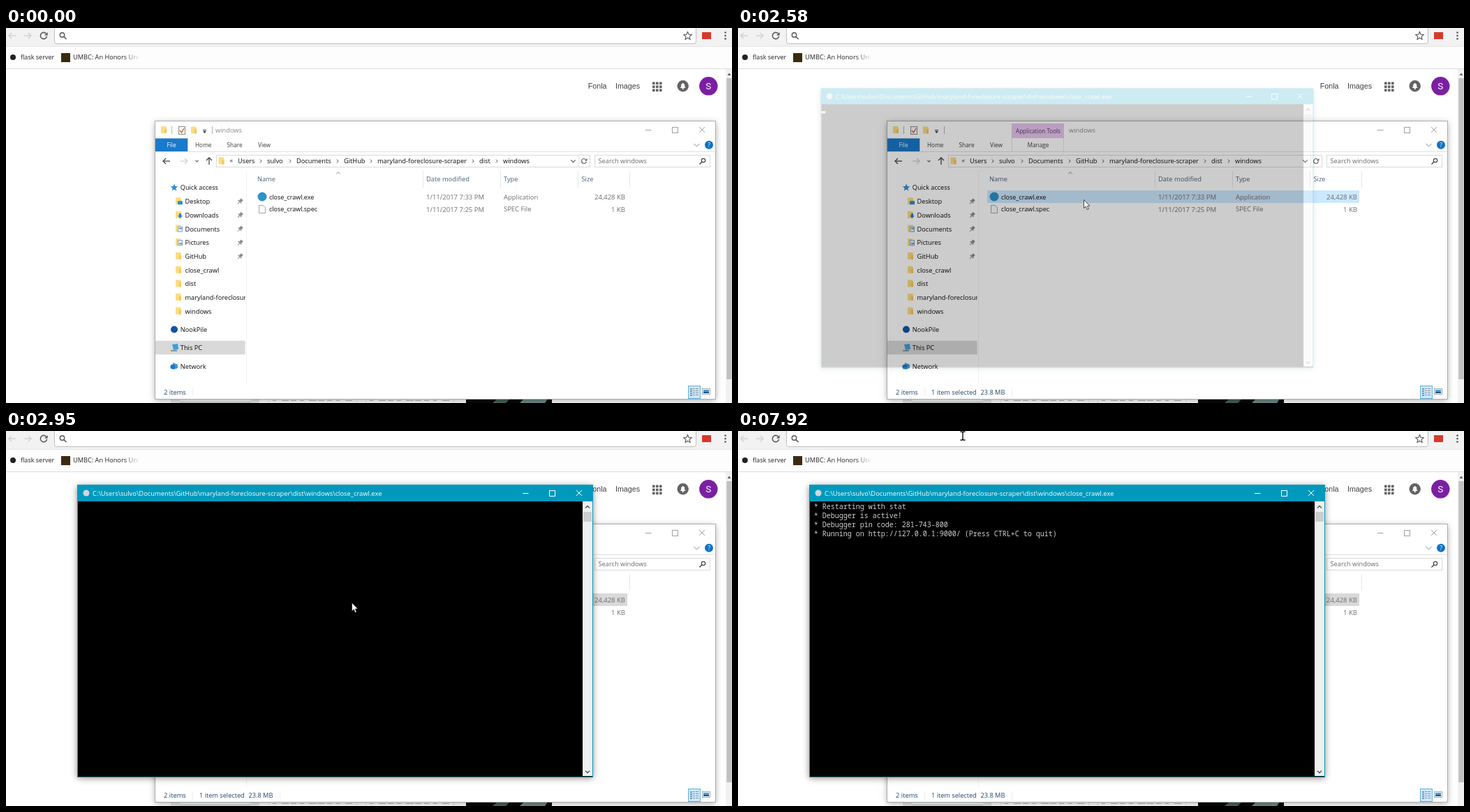
These frames come from a looping animation (1040 px wide and 538 px high, 8 s). An HTML page with a canvas:

```html
<!DOCTYPE html>
<html lang="en">
<head>
<meta charset="utf-8">
<title>Launching close_crawl</title>
<style>
html, body { margin: 0; width: 100%; height: 100%; overflow: hidden; background: #fff; }
canvas { display: block; }
</style>
</head>
<body>
<canvas id="stage" width="1040" height="538"></canvas>
<script>
const W = 1040, H = 538, LOOP = 8000;
const SANS = '"Open Sans", "Noto Sans", sans-serif';
const ARIAL = '"Liberation Sans", Arial, sans-serif';
const MONO = '"Noto Sans Mono", "DejaVu Sans Mono", monospace';
const ACCENT = '#0099bc';
const USER = 'sulvo';

const stage = document.getElementById('stage').getContext('2d');
const layer = document.createElement('canvas');
layer.width = W;
layer.height = H;
const layerCtx = layer.getContext('2d');
let c = stage;

// ---- drawing helpers ----
function rect(x, y, w, h, color) {
  c.fillStyle = color;
  c.fillRect(x, y, w, h);
}
function frame(x, y, w, h, color) {
  c.strokeStyle = color;
  c.lineWidth = 1;
  c.strokeRect(x + .5, y + .5, w - 1, h - 1);
}
function disc(x, y, r, color) {
  c.fillStyle = color;
  c.beginPath();
  c.arc(x, y, r, 0, 7);
  c.fill();
}
function path(points) {
  c.beginPath();
  for (let i = 0; i < points.length; i += 2) c.lineTo(points[i], points[i + 1]);
}
function line(points, color, width = 1) {
  path(points);
  c.strokeStyle = color;
  c.lineWidth = width;
  c.stroke();
}
function poly(points, color) {
  path(points);
  c.closePath();
  c.fillStyle = color;
  c.fill();
}
// y is the middle of the capitals
function text(s, x, y, color = '#0c0c0c', size = 9.25, align = 'left', font = SANS) {
  c.font = size + 'px ' + font;
  c.textAlign = align;
  c.fillStyle = color;
  c.fillText(s, x, y + size * .37);
}
// dir: 0 right, 1 down, 2 left, 3 up
function chevron(x, y, dir, color, r = 2, width = 1) {
  c.save();
  c.translate(x, y);
  c.rotate(dir * Math.PI / 2);
  line([-r / 2, -r, r / 2, 0, -r / 2, r], color, width);
  c.restore();
}
function arrow(x, y, dir, color, r = 5, width = 1.3) {
  c.save();
  c.translate(x, y);
  c.rotate(dir * Math.PI / 2);
  line([-r, 0, r, 0], color, width);
  line([r - 4, -4, r, 0, r - 4, 4], color, width);
  c.restore();
}
function ring(x, y, r, color, width, from = 0, to = 7) {
  c.strokeStyle = color;
  c.lineWidth = width;
  c.beginPath();
  c.arc(x, y, r, from, to);
  c.stroke();
}
function reload(x, y, r, color, width) {
  ring(x, y, r, color, width, .2, 5.5);
  poly([x + r + 1, y - r - .5, x + r + 1, y - .5, x + 1, y - .5], color);
}
function star(x, y, r) {
  const p = [];
  for (let i = 0; i < 10; i++) {
    const a = i * Math.PI / 5 - Math.PI / 2, d = i % 2 ? r * .45 : r;
    p.push(x + d * Math.cos(a), y + d * Math.sin(a));
  }
  path(p);
  c.closePath();
}
function folder(x, y) {
  poly([x - 4, y - 5, x + 3, y - 5, x + 4, y - 3, x + 4, y + 5, x - 4, y + 5], '#fcdc82');
  rect(x + 1, y - 1, 3, 6, '#f5c75f');
}
function captionButtons(x, y, gap, color) {
  line([x - 4, y + .5, x + 4.5, y + .5], color);
  frame(x + gap - 4, y - 4, 9, 9, color);
  const k = x + 2 * gap + 1;
  line([k - 4, y - 4, k + 4, y + 4], color);
  line([k - 4, y + 4, k + 4, y - 4], color);
}
function panel(x, y, w, h, fill, shade) {
  c.save();
  c.shadowColor = `rgba(0,0,0,${shade})`;
  c.shadowBlur = 9;
  c.shadowOffsetY = 2;
  rect(x, y, w, h, fill);
  c.restore();
}

// ---- browser ----
function browser() {
  rect(0, 0, W, H, '#fff');
  rect(0, 0, W, 27, '#f2f2f2');
  rect(0, 26, W, 1, '#e6e6e6');
  rect(0, 27, W, 31, '#fdfdfd');
  rect(0, 58, W, 1, '#dcdcdc');
  c.beginPath();
  c.roundRect(69.5, -5, 919, 27.5, 3);
  c.fillStyle = '#fff';
  c.fill();
  c.strokeStyle = '#bdbdbd';
  c.lineWidth = 1;
  c.stroke();
  arrow(9, 11, 2, '#cfcfcf');
  arrow(31, 11, 0, '#cfcfcf');
  reload(54, 11, 4.6, '#555', 1.6);
  ring(80.5, 10, 3.2, '#555', 1.4);
  line([83, 12.5, 86.5, 16], '#555', 1.6);
  star(976.5, 11.5, 6);
  c.strokeStyle = '#555';
  c.lineWidth = 1.1;
  c.stroke();
  rect(997, 6, 13, 10, '#d6392c');
  for (const y of [6.5, 11, 15.5]) disc(1030.5, y, 1.3, '#555');

  disc(10, 42, 4, '#222');
  text('flask server', 21, 42, '#222', 9.05);
  rect(79, 36, 13, 13, '#3b2a10');
  text('UMBC: An Honors Uni', 96, 42, '#222', 9.2);
  const fade = c.createLinearGradient(168, 0, 192, 0);
  fade.addColorStop(0, 'rgba(253,253,253,0)');
  fade.addColorStop(1, '#fdfdfd');
  rect(168, 34, 40, 18, fade);

  text('Fonla', 860.5, 83.5, '#404040', 10.7, 'right', ARIAL);
  text('Images', 873, 83.5, '#404040', 10.7, 'left', ARIAL);
  for (let i = 0; i < 9; i++) rect(926 + i % 3 * 5, 77.5 + (i / 3 | 0) * 5, 3.6, 3.6, '#636363');
  disc(969.7, 83.3, 8.2, '#636363');
  poly([965.7, 86, 967.2, 84, 967.2, 81, 969.7, 78.8, 972.2, 81, 972.2, 84, 973.7, 86], '#fff');
  disc(969.7, 87.2, 1.1, '#fff');
  disc(1006.3, 83.3, 13.2, '#7b1fa2');
  text('S', 1006.3, 83.5, '#fff', 13.5, 'center', 'Roboto, sans-serif');

  rect(1031, 59, 9, H - 59, '#f1f1f1');
  rect(1032.3, 72, 7.4, 432, '#c1c1c1');
  poly([1033.5, 68, 1038.5, 68, 1036, 64.5], '#606060');

  // result thumbnails peeking out below the window
  rect(236, 520, 127, 18, '#e3e5e5');
  rect(249, 520, 102, 17, '#f7f9f9');
  rect(249, 536, 102, 1, '#b3c8c4');
  for (const x of [376, 515]) {
    frame(x, 520, 127, 30, '#e8e8e8');
    for (let i = 0; i < 9; i++) rect(x + 6 + i * 13, 534, 5 + i * 5 % 7, 1, '#b5b5b5');
  }
  rect(659, 520, 123, 18, '#050707');
  poly([697, 538, 704, 532, 722, 532, 716, 538], '#46605b');
  poly([736, 538, 742, 532, 776, 532, 772, 538], '#6f8a84');
}

// ---- file explorer ----
const sidebar = ['Desktop', 'Downloads', 'Documents', 'Pictures', 'GitHub',
  'close_crawl', 'dist', 'maryland-foreclosure-scraper', 'windows'];
const crumbs = [['Users', 332], [USER, 374], ['Documents', 416], ['GitHub', 484],
  ['maryland-foreclosure-scraper', 532], ['dist', 678], ['windows', 712]];

function sideIcon(i, x, y) {
  folder(x, y);
  if (i === 0) rect(x - 1, y, 7, 5, '#2b8fd8');
  if (i === 1) poly([x - 1, y + 1, x + 1, y + 1, x + 1, y - 2, x + 4, y - 2, x + 4, y + 1, x + 6, y + 1, x + 2.5, y + 5], '#2b7fd0');
  if (i === 2 || i === 3) {
    rect(x - 1, y - 3, 7, 8, '#eef3f7');
    frame(x - 1, y - 3, 7, 8, '#8ba4b5');
    rect(x + 1, y + (i - 2) * 2 - 1, 4, 2, '#5a9bc9');
  }
}
function pin(x, y) {
  c.save();
  c.translate(x, y);
  c.rotate(.75);
  rect(-2, -4, 4, 4, '#858c92');
  rect(-3.2, 0, 6.4, 1.3, '#858c92');
  rect(-.5, 1, 1, 4, '#858c92');
  c.restore();
}
function explorer(t, mouse) {
  const active = t >= 2180 && t < 2580;
  const selected = t >= 2180, tools = t >= 2290;
  panel(214, 134, 802, 398, '#fff', active ? .5 : .36);

  // title bar
  if (active) rect(214, 134, 802, 24, ACCENT);
  folder(226, 146);
  rect(237, 141, 1, 11, active ? '#8fd0e0' : '#b0b0b0');
  rect(247, 141, 10, 12, '#fafafa');
  frame(247, 141, 10, 12, '#8a8a8a');
  line([249, 147, 251.5, 150, 255, 144], '#c5642b', 1.4);
  folder(269, 146.5);
  rect(282, 146, 5, 1, active ? '#fff' : '#333');
  poly([282, 148, 287, 148, 284.5, 151], active ? '#fff' : '#333');
  rect(295, 141, 1, 11, active ? '#8fd0e0' : '#b0b0b0');
  if (tools) {
    rect(392, 137, 75, 21, '#e9c6f0');
    text('Application Tools', 430, 148.5, '#5d3a68', 8.1, 'center');
    rect(392, 158, 1, 19, '#eadcee');
    rect(466, 158, 1, 19, '#eadcee');
    text('Manage', 430, 168, '#444', 8.3, 'center');
  }
  text('windows', tools ? 474 : 300, 146.5, active ? '#fff' : '#8a8a8a');
  captionButtons(920, 146, 38, active ? '#fff' : '#a0a0a0');

  // ribbon tabs
  rect(214, 158.4, 46.3, 18.6, '#1979ca');
  text('File', 237, 168, '#fff', 8.3, 'center');
  text('Home', 271, 168, '#3c3c3c', 8.3);
  text('Share', 316.5, 168, '#3c3c3c', 8.3);
  text('View', 361, 168, '#3c3c3c', 8.3);
  chevron(989.5, 168, 1, '#8a8a8a', 4);
  disc(1007, 167.7, 6, '#0f72c4');
  text('?', 1007, 167.7, '#fff', 8.5, 'center');
  rect(214, 177, 802, 1, '#dfe0e1');

  // address row
  arrow(230, 191, 2, '#444');
  arrow(255, 191, 0, '#cfcfcf');
  chevron(273.5, 191, 1, '#666', 2, 1.2);
  arrow(291, 191, 3, '#444');
  frame(301, 182, 536, 18, '#dadada');
  rect(820, 183, 1, 16, '#e2e2e2');
  folder(308.5, 190.5);
  text('«', 320.5, 190, '#333', 9);
  crumbs.forEach(([s, x], i) => {
    text(s, x, 191);
    if (i) chevron(x - 9, 191, 0, '#555', 2.4);
  });
  chevron(812.5, 191, 1, '#555', 3.2, 1.2);
  reload(828, 191, 3.4, '#555', 1.1);
  frame(843, 182, 166, 18, '#dadada');
  text('Search windows', 848.5, 191, '#6a6a6a');
  ring(999, 190, 2.7, '#444', 1.2);
  line([997, 192, 993.5, 195.5], '#444', 1.4);

  // column headers
  if (mouse && t < 2000 && mouse.y < 229) rect(346, 205, 251, 25, '#d9ebf9');
  chevron(476, 208, 3, '#888', 2.8);
  const head = '#4c607a';
  text('Name', 360, 217, head);
  text('Date modified', 602, 217, head, 9.35);
  text('Type', 713, 217, head);
  text('Size', 824.5, 217, head);
  for (const x of [597, 708, 819, 893]) rect(x, 205, 1, 24, '#e7e7e7');

  // files
  const onRow = mouse && mouse.y > 233 && mouse.y < 251;
  if (selected) rect(357, 233, 533, 18, t < 2830 ? '#cce8ff' : '#d9d9d9');
  else if (onRow) rect(357, 233, 533, 18, '#e5f3ff');
  disc(367, 242, 6.5, '#2e93c8');
  poly([362, 254, 368, 254, 371, 257, 371, 266, 362, 266], '#fafafa');
  line([362.5, 254.5, 368, 254.5, 371.5, 257.5, 371.5, 265.5, 362.5, 265.5, 362.5, 254], '#a5a5a5');
  [['close_crawl.exe', '1/11/2017 7:33 PM', 'Application', '24,428 KB'],
   ['close_crawl.spec', '1/11/2017 7:25 PM', 'SPEC File', '1 KB']].forEach((f, i) => {
    const y = 242.5 + i * 17.5;
    text(f[0], 377, y, undefined, 9);
    text(f[1], 602, y, '#6d6d6d', 9.5);
    text(f[2], 713, y, '#6d6d6d', 9.45);
    text(f[3], 887, y, '#6d6d6d', 9.5, 'right');
  });

  // navigation pane
  star(241, 229, 5.5);
  c.fillStyle = '#2f8fdc';
  c.fill();
  text('Quick access', 249.8, 229, undefined, 9.15);
  c.save();
  c.beginPath();
  c.rect(214, 205, 129, 306);
  c.clip();
  sidebar.forEach((s, i) => {
    const y = 248.7 + i * 19.7;
    sideIcon(i, 247, y - .5);
    text(s, 256.5, y);
    if (i < 5) pin(335.5, y);
  });
  c.restore();
  disc(241, 432.5, 5, '#1254a4');
  text('NookPile', 249.8, 433);
  rect(214, 448.7, 128.6, 19.7, '#d9d9d9');
  poly([238, 454, 246, 453, 247, 461, 240, 462], '#3c9fdc');
  rect(236, 462, 9, 2, '#8b98a2');
  text('This PC', 249.8, 459);
  poly([239, 480, 246, 483, 246, 488, 240, 490], '#3c9fdc');
  disc(239, 486, 3.6, '#2478c2');
  text('Network', 249.8, 485.3);
  rect(344, 205, 1, 306, '#f1f1f1');

  // status bar
  const note = '#1f4468';
  text('2 items', 226, 523, note, 9.35);
  rect(267, 517, 1, 12, '#eeeeee');
  if (tools) {
    text('1 item selected', 277, 523, note, 9.2);
    text('23.8 MB', 347.5, 523, note, 9.2);
    rect(392, 517, 1, 12, '#eeeeee');
  }
  rect(977, 513, 18, 19, '#cce8ff');
  frame(977, 513, 18, 19, '#5fb2e2');
  for (let i = 0; i < 4; i++) {
    rect(980, 517 + i * 3, 3, 2, '#7b98ab');
    rect(984, 517 + i * 3, 3, 1, '#8a8f94');
    rect(988, 517 + i * 3, 4, 1, '#8a8f94');
  }
  rect(997, 517, 12, 9, '#fff');
  frame(997, 517, 12, 9, '#9aa9b4');
  rect(999, 519, 8, 3, '#4d9ad6');
  rect(999, 522, 8, 2, '#25536f');
  frame(213, 133, 804, 400, active ? ACCENT : '#adadad');
}

// ---- console window ----
const output = ['* Restarting with stat', '* Debugger is active!', '* Debugger pin code: 281-743-800',
  '* Running on http://127.0.0.1:9000/ (Press CTRL+C to quit)'];
const opening = [[2580, .955, .2], [2670, .977, .53], [2830, .9945, .89], [2950, 1, 1]];

function terminal(t) {
  panel(102, 77, 739, 419, '#000', .45);
  rect(102, 77, 739, 24, ACCENT);
  disc(115, 89, 4.5, '#cfd8dc');
  const dir = ['C:', 'Users', USER, 'Documents', 'GitHub', 'maryland-foreclosure-scraper', 'dist', 'windows'];
  text(dir.join('\\') + '\\close_crawl.exe', 124, 89.5, '#fff', 9.35);
  captionButtons(744, 89, 38, '#fff');
  rect(826, 101, 14, 394, '#f0f0f0');
  rect(827, 116, 12, 14, '#cdcdcd');
  chevron(833, 109, 3, '#505050', 3, 1.4);
  chevron(833, 489, 1, '#505050', 3, 1.4);
  frame(102, 77, 739, 420, ACCENT);

  const shown = t < 4260 ? 0 : t < 6000 ? 1 : 4;
  for (let i = 0; i < shown; i++) text(output[i], 108.7, 108 + i * 13.15, '#d0d0d0', 10, 'left', MONO);
  if (t < 2950 || t >= 7130 && t < 7620) rect(103, 111.5 + shown * 13.15, 6, 3, '#fff');
}
function showTerminal(t) {
  const [, scale, alpha] = opening.findLast(s => t >= s[0]);
  c = layerCtx;
  c.clearRect(0, 0, W, H);
  terminal(t);
  c = stage;
  c.save();
  c.globalAlpha = alpha;
  c.translate(471, 286.5);
  c.scale(scale, scale);
  c.drawImage(layer, -471, -286.5);
  c.restore();
}

// ---- mouse ----
// progress along a move in n hard steps, from start to end time
function stepped(t, start, end, n) {
  return Math.min(n - 1, Math.floor((t - start) / (end - start) * (n - 1) + 1e-6)) / (n - 1);
}
function between(x0, y0, x1, y1, p) {
  return { x: x0 + (x1 - x0) * p, y: y0 + (y1 - y0) * p };
}
function mouseAt(t) {
  if (t < 530) return null;
  if (t < 1050) return between(794, 447, 474, 213, stepped(t, 530, 800, 4));
  if (t < 7220) {
    const p = stepped(t, 965, 1560, 8);
    return between(474, 213, 495, 246, p * p * (3 - 2 * p));
  }
  if (t < 7720) return null;
  const p = stepped(t, 7720, 7920, 3);
  return { ...between(290, 120, 322, 7, p), beam: p === 1 };
}
function drawMouse({ x, y, beam }) {
  if (beam) {
    line([x - 3.5, y - 6, x - 1, y - 6, x, y - 5, x + 1, y - 6, x + 3.5, y - 6], '#111', 1.3);
    line([x, y - 5, x, y + 5], '#111', 1.4);
    line([x - 3.5, y + 6, x - 1, y + 6, x, y + 5, x + 1, y + 6, x + 3.5, y + 6], '#111', 1.3);
    return;
  }
  c.save();
  c.translate(x, y);
  poly([.5, .5, .5, 12.5, 3.2, 10, 5.2, 14.5, 7.2, 13.6, 5.3, 9.3, 8.8, 9], '#fff');
  c.strokeStyle = '#333';
  c.lineWidth = .9;
  c.stroke();
  c.restore();
}

function draw() {
  const t = performance.now() % LOOP;
  const mouse = mouseAt(t);
  browser();
  explorer(t, mouse);
  if (t >= 2580) showTerminal(t);
  if (mouse) drawMouse(mouse);
  requestAnimationFrame(draw);
}
draw();
</script>
</body>
</html>
```
